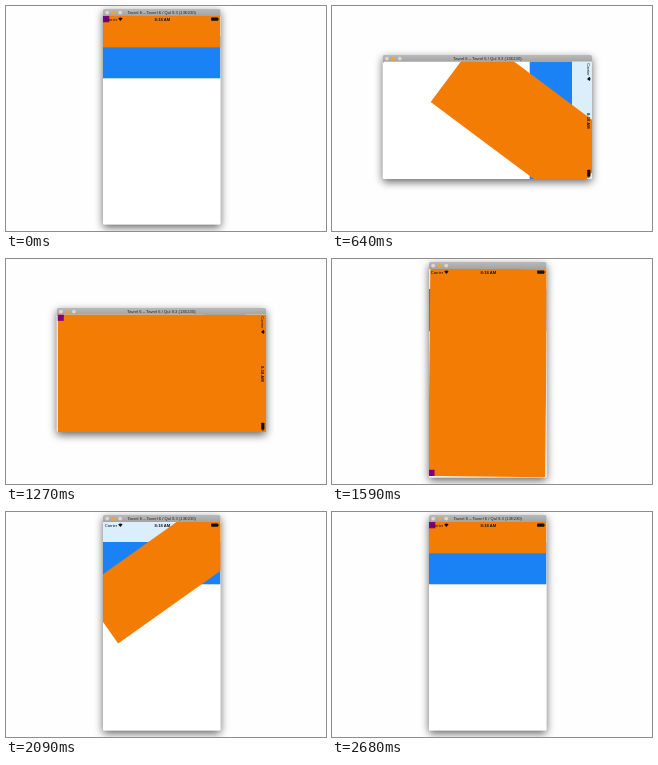
Animation of 320x225 px, one loop 2720 ms. Source, as an HTML page:

```html
<!DOCTYPE html>
<html lang="en">
<head>
<meta charset="utf-8">
<title>Rotating menu</title>
<style>
  html, body { margin: 0; width: 100%; height: 100%; overflow: hidden; background: #fefefe; }
  svg { display: block; }
  #stage { width: 100vw; height: 100vh; }
  text { font-family: "Liberation Sans", Arial, sans-serif; }
  #frame { filter: drop-shadow(0 3.5px 4px rgba(0, 0, 0, .6)); }
</style>
</head>
<body>
<svg id="stage" viewBox="0 0 320 225">
  <defs>
    <linearGradient id="barFill" x2="0" y2="1">
      <stop offset="0" stop-color="#b9b9b9"/>
      <stop offset="1" stop-color="#a0a0a0"/>
    </linearGradient>
    <clipPath id="screenClip"><rect width="117.5" height="208.5"/></clipPath>
  </defs>

  <rect id="frame" rx="1.5" fill="#fff"/>
  <g id="bar">
    <rect id="barBox" height="8" rx="1.5" fill="url(#barFill)"/>
    <circle cx="4.2" cy="3.6" r="1.9" fill="#e6d3c9"/>
    <circle cx="10.7" cy="3.6" r="1.9" fill="#f0a339"/>
    <circle cx="17.2" cy="3.6" r="1.9" fill="#ded7c4"/>
    <text id="title" y="5.1" font-size="4.15" text-anchor="middle" fill="#222">Tavrel 6 – Tavrel 6 / Qul 9.3 (13E230)</text>
  </g>

  <g id="screen">
    <g clip-path="url(#screenClip)">
      <rect width="117.5" height="208.5" fill="#fff"/>
      <rect width="117.5" height="20" fill="#dbeefb"/>
      <rect y="20" width="117.5" height="42.3" fill="#1b82f6"/>
      <g id="menu">
        <rect id="panel" fill="#f37c05"/>
        <rect id="corner" width="6.3" height="6.3" fill="#80007c"/>
      </g>
      <g fill="#111">
        <text x="1.7" y="4.7" font-size="4.1">Carrier</text>
        <path d="M15.2 2.5 Q17.4 .6 19.6 2.5 L17.4 5 Z"/>
        <text x="59.3" y="4.7" font-size="4.1" font-weight="bold" text-anchor="middle">8:18 AM</text>
        <rect x="108.2" y="1.6" width="7" height="3.2" rx=".6"/>
        <rect x="115.5" y="2.5" width=".6" height="1.4"/>
      </g>
    </g>
  </g>
</svg>

<script>
const LOOP = 2720, STEP = 1000 / 22, SWING = 990;
const W = 117.5, H = 208.5, STRIP = 31.3;
const OPEN_AT = 92, CLOSE_AT = 1533;
const TURN = [50, 1500], TITLE_GAP = 135;

const poses = {
  portrait:  { x: 97, y: 3, w: W, h: 215.5, screen: "translate(97 10)" },
  landscape: { x: 50.7, y: 49, w: 209.3, h: 124, screen: "translate(260 55.5) rotate(90)" }
};

const el = id => document.getElementById(id);
const set = (id, attrs) => {
  for (const key in attrs) el(id).setAttribute(key, attrs[key]);
};
const mix = (a, b, k) => a + (b - a) * k;

// cubic-bezier(.42, 0, .58, 1)
function ease(x) {
  if (x <= 0) return 0;
  if (x >= 1) return 1;
  let lo = 0, hi = 1, s = .5;
  for (let i = 0; i < 24; i++) {
    s = (lo + hi) / 2;
    const bx = 3 * (1 - s) * s * ((1 - s) * .42 + s * .58) + s ** 3;
    if (bx < x) lo = s; else hi = s;
  }
  return s * s * (3 - 2 * s);
}

function drawWindow(t) {
  const flat = t >= TURN[0] && t < TURN[1];
  const p = flat ? poses.landscape : poses.portrait;
  const hidden = TURN.some(at => t >= at && t < at + TITLE_GAP);
  set("frame", { x: p.x, y: p.y, width: p.w, height: p.h });
  set("bar", { transform: `translate(${p.x} ${p.y})` });
  set("barBox", { width: p.w });
  set("title", { x: p.w / 2, visibility: hidden ? "hidden" : "visible" });
  set("screen", { transform: p.screen });
}

// Angle, size and centre all move together; k = 1 is closed.
function drawMenu(t) {
  const k = 1 - ease((t - OPEN_AT) / SWING) + ease((t - CLOSE_AT) / SWING);
  const w = mix(W, STRIP, k), h = mix(H, W, k);
  const cy = mix(H / 2, STRIP / 2, k);
  set("menu", {
    transform: `translate(${W / 2} ${cy}) rotate(${90 * k}) translate(${-w / 2} ${-h / 2})`
  });
  set("panel", { width: w, height: h });
  set("corner", { y: h - 6.3 });
}

function draw(ms) {
  const n = Math.floor((ms % LOOP + 5) / STEP);
  const t = Math.round(n * STEP / 10) * 10 % LOOP;
  drawWindow(t);
  drawMenu(t);
}

const start = performance.now();
function tick() {
  draw(performance.now() - start);
  requestAnimationFrame(tick);
}
tick();
</script>
</body>
</html>
```
